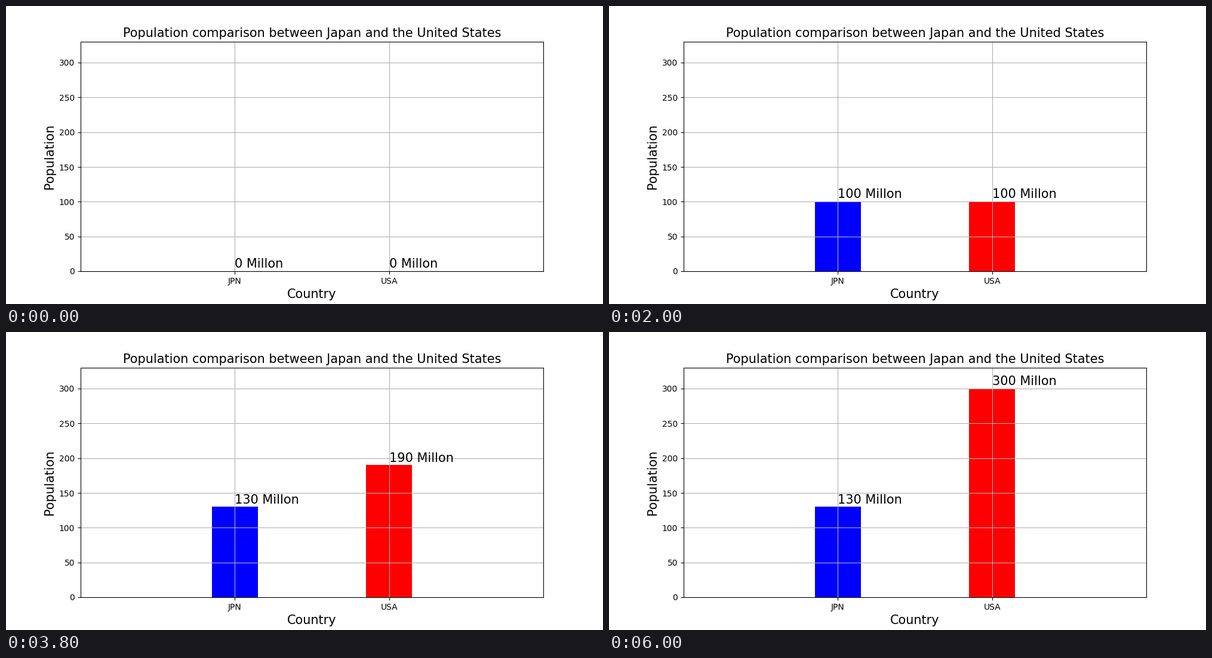
Animation of 1000 by 500 pixels, one loop 6.2 s. Source, as a matplotlib script:

```python
import matplotlib.pyplot as plt
from matplotlib.animation import FuncAnimation

plt.rcParams["font.family"] = "DejaVu Sans"

STEP = 10        # millions added per frame
FRAMES = 31
LIMITS = (130, 300)
FONT = 15

fig, ax = plt.subplots(figsize=(10, 5), dpi=100)
ax.set_title("Population comparison between Japan and the United States",
             fontsize=FONT)
ax.set_xlabel("Country", fontsize=FONT)
ax.set_ylabel("Population", fontsize=FONT)
ax.set_xticks([1, 2], ["JPN", "USA"])
ax.grid(True)

bars = ax.bar([1, 2], [0, 0], width=0.3, color=["blue", "red"])
labels = [ax.text(x, 5, "", fontsize=FONT) for x in (1, 2)]
ax.set_xlim(0, 3)
ax.set_ylim(0, 330)


def update(frame):
    for bar, label, limit in zip(bars, labels, LIMITS):
        value = min(frame * STEP, limit)
        bar.set_height(value)
        label.set_y(value + 5)
        label.set_text(f"{value} Millon")
    return [*bars, *labels]


anim = FuncAnimation(fig, update, frames=FRAMES, interval=200,
                     init_func=lambda: update(0), repeat=True, repeat_delay=0)
plt.show()
```
